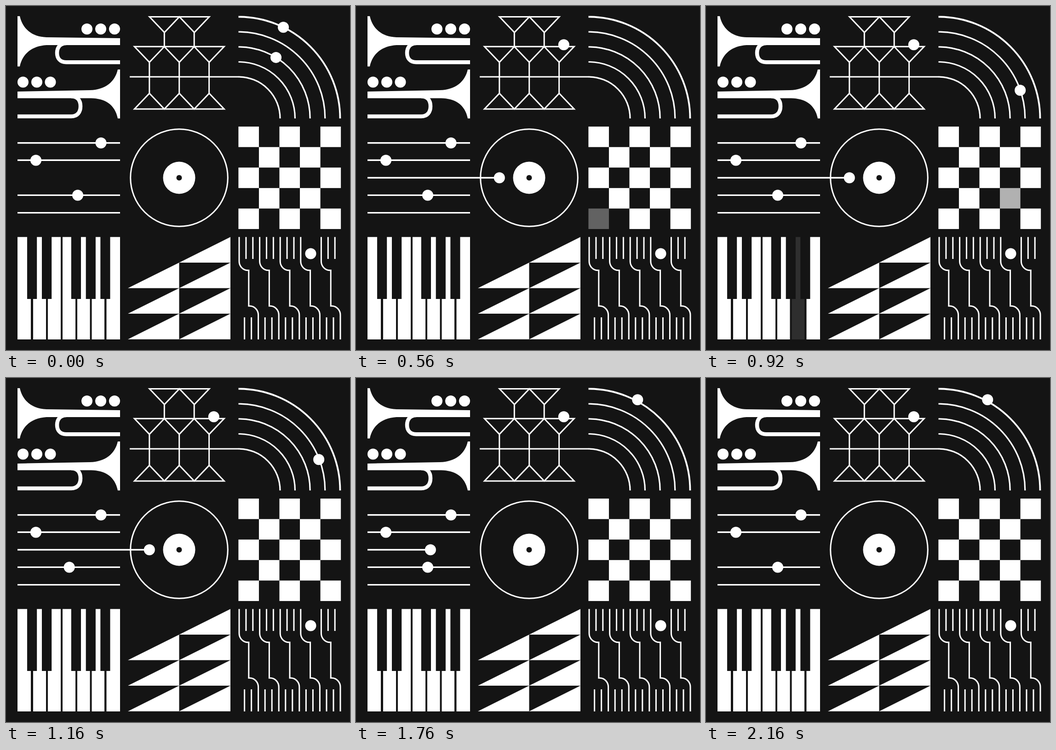
An HTML page for the animation above (2400 ms loop, 748 by 748 pixels).

```html
<!DOCTYPE html>
<html lang="en">
<head>
<meta charset="utf-8">
<title>Music tiles</title>
<style>
  html, body { margin: 0; width: 100%; height: 100%; overflow: hidden; background: #141414; }
  svg { display: block; width: 100vw; height: 100vh; }
</style>
</head>
<body>
<svg id="stage" viewBox="0 0 748 748">
  <defs><clipPath id="armClip"><rect x="25" y="350" width="320" height="50"/></clipPath></defs>
</svg>
<script>
const LOOP = 2400, STEP = 40;
const BG = '#141414', INK = '#fff';
const stage = document.getElementById('stage');

function add(tag, attrs, parent = stage) {
  const el = document.createElementNS('http://www.w3.org/2000/svg', tag);
  set(el, attrs);
  parent.appendChild(el);
  return el;
}
function set(el, attrs) {
  for (const k in attrs) el.setAttribute(k, attrs[k]);
}
const fill = (d, parent) => add('path', { d, fill: INK }, parent);
const line = (d, width = 3, parent = stage) =>
  add('path', { d, fill: 'none', stroke: INK, 'stroke-width': width }, parent);
const dot = (cx, cy, r = 12, color = INK, parent = stage) =>
  add('circle', { cx, cy, r, fill: color }, parent);
const rect = (x, y, width, height, color = INK) =>
  add('rect', { x, y, width, height, fill: color });

// Trumpets
fill('M25 22H30C36 49 56 67 88 68L248 70V85H88C57 87 36 103 30 131.5H25Z');
line('M131 81C118 81 111 90 111 102C111 114 118 122.3 131 122.3H248', 8.5);
fill('M25 186L183 183C216 182 237 165 243 138H248V244.5H243C237 214 215 201 185 200.5H25Z');
line('M142 196.5C155 196.5 162 205 162 218C162 231 155 240 142 240H25', 8.5);
const valves = [176, 206, 236].map(x => dot(x, 50));
[37, 67, 96.5].forEach(x => dot(x, 165.5));

// Lattice
function zigzag(x, y, dy, count) {
  let d = `M${x} ${y}`;
  for (let i = 1; i <= count; i++) d += `L${x + i * 32.5} ${y + (i % 2 ? dy : 0)}`;
  return d + 'Z';
}
line(zigzag(312, 23.5, 34, 4));
line(zigzag(279.3, 88.3, 34, 6));
line(zigzag(279.3, 224, -34, 6));
[344.3, 409.2].forEach(x => line(`M${x} 57V88`));
[311.8, 376.7, 441.6].forEach(x => line(`M${x} 122V190`));

// Arcs
const HUB = { x: 505.5, y: 244.5 };
line('M269 154H506');
[90.5, 123, 155.7, 188.3, 221].forEach((r, i) =>
  line(`M${HUB.x} ${HUB.y - r}A${r} ${r} 0 0 1 ${HUB.x + r} ${HUB.y}`, i === 4 ? 3.8 : 3.2));
const onArc = (r, deg) => {
  const a = deg * Math.PI / 180;
  return [HUB.x + r * Math.sin(a), HUB.y - r * Math.cos(a)];
};

// Sliders
[297.7, 335.3, 411.4, 449.6].forEach(y => line(`M25 ${y}H248`, 3.4));
dot(206.5, 297.8);
dot(65, 335.4);
const slider = dot(156, 411.4);

// Record and arm
add('circle', { cx: 376.5, cy: 373.5, r: 105.8, fill: 'none', stroke: INK, 'stroke-width': 3 });
dot(376.5, 373.5, 35);
dot(376.5, 373.5, 6, BG);
const arm = add('g', { 'clip-path': 'url(#armClip)' });
const armLine = line('', 3.4, arm);
const armDot = dot(0, 373.5, 12, INK, arm);

// Checkerboard
const CELL = 44.55, squares = {};
for (let row = 0; row < 5; row++)
  for (let col = row % 2; col < 5; col += 2)
    squares[`${row},${col}`] = rect(505.4 + col * CELL, 262.2 + row * CELL, CELL, CELL);

// Piano
const keys = [[25, 54], [59, 87], [91, 119], [123, 151], [155, 182.5], [186.5, 214], [218.5, 248]]
  .map(([a, b]) => rect(a, 502.3, b - a, 222.7));
[46, 78, 141.8, 173.7, 205.3].forEach(x => rect(x, 500, 21.2, 137, BG));

// Sawtooth triangles
for (let row = 0; row < 4; row++)
  for (let col = row ? 0 : 1; col < 2; col++) {
    const x = 265 + col * 111.5, y = 502.3 + row * 55.6;
    fill(`M${x} ${y + 55.6}L${x + 111.5} ${y}V${y + 55.6}Z`);
  }

// Circuit
for (let i = 0; i < 5; i++) {
  const x = 507 + i * 44.6;
  line(`M${x} 502.3V555a19 19.5 0 0 0 19 19.8h1.8V652.3h1.8a19 19.5 0 0 1 19 19.8V725`);
  for (let j = 1; j < 3; j++) {
    if (i !== 3) line(`M${x + j * 14.9} 502.3V550`);
    line(`M${x + 41.6 - j * 15} 677V725`);
  }
}
dot(662.5, 538.4);

// Travelling dots
const roller = dot(603, 45), inner = dot(587, 112), hopper = dot(683.2, 183.2, 0);

// Motion helpers
const span = (t, a, b) => Math.min(1, Math.max(0, (t - a) / (b - a)));
const ease = p => p * p * (3 - 2 * p);
const mix = (a, b, p) => a + (b - a) * p;
const dip = (t, start) => Math.abs(1 - 2 * span(t, start, start + 240));
const place = (el, [cx, cy], r = 12) => set(el, { cx, cy, r });

function draw(t) {
  const reach = ease(span(t, 100, 520)) * (1 - ease(span(t, 1560, 1960)));
  const x = mix(12, 311.8, reach);
  set(armLine, { d: `M0 373.5H${x}` });
  set(armDot, { cx: x });
  set(arm, { visibility: reach > 0 ? 'visible' : 'hidden' });

  if (t < 240) {
    place(roller, onArc(221, mix(26.2, 0, span(t, 0, 240))));
  } else {
    const p = span(t, 240, 520);
    place(roller, [mix(HUB.x, 451.8, p), mix(23.5, 84.3, p * p)]);
  }
  place(inner, onArc(155.7, mix(31.6, 0, span(t, 0, 280))), 12 * (1 - span(t, 280, 400)));

  const hop = ease(span(t, 1120, 1440));
  place(hopper, [mix(683.2, 612.3, hop), mix(183.2, 47.2, hop)], 12 * ease(span(t, 560, 720)));

  set(squares['4,0'], { opacity: dip(t, 480) });
  set(squares['3,3'], { opacity: dip(t, 880) });
  set(squares['0,0'], { opacity: dip(t, 1920) });
  set(keys[2], { opacity: dip(t, 600) ** 2 });
  set(keys[5], { opacity: dip(t, 840) ** 2 });

  valves.forEach((v, i) => {
    const start = 920 + i * 40;
    set(v, { cy: 50 + 5 * Math.sin(Math.PI * span(t, start, start + 120)) });
  });
  set(slider, { cx: 156 - 48 * Math.sin(Math.PI * span(t, 1120, 1440)) });
}

const begin = performance.now();
function tick() {
  const t = (performance.now() - begin) % LOOP;
  draw(Math.floor(t / STEP) * STEP);
  requestAnimationFrame(tick);
}
draw(0);
requestAnimationFrame(tick);
</script>
</body>
</html>
```
